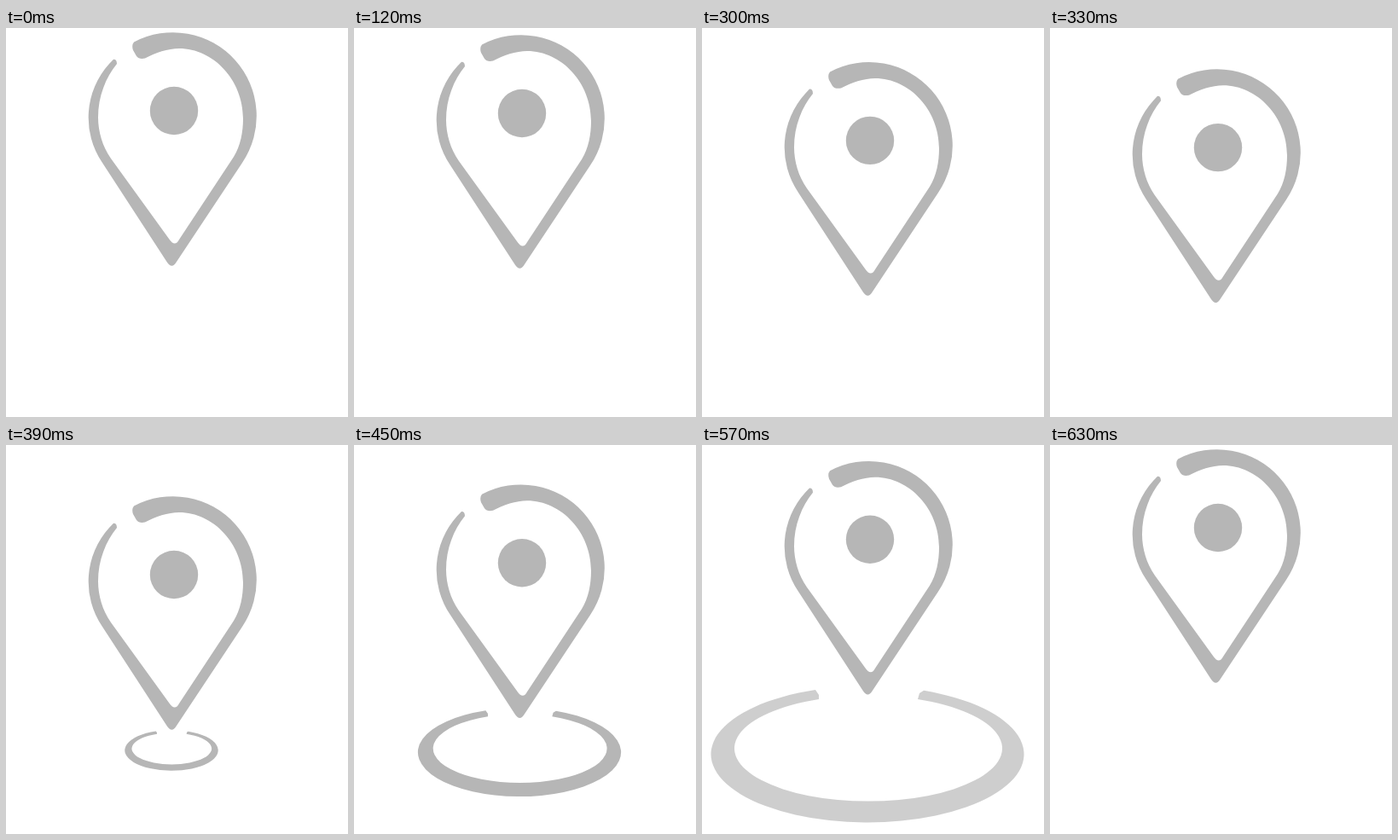
An HTML page for the animation above (750 ms loop, 401 by 456 pixels).

```html
<!DOCTYPE html>
<html lang="en">
<head>
<meta charset="utf-8">
<title>Map pin</title>
<style>
  html, body { margin: 0; width: 100%; height: 100%; overflow: hidden; background: #fff; }
  svg { display: block; width: 401px; height: 456px; fill: #b6b6b6; }
</style>
</head>
<body>
<svg viewBox="0 0 401 456">
  <g id="pin">
    <path d="M150 16.5 A98 98 0 0 1 277 158 L200 274 Q194.5 283.5 188.5 274 L113 158
             A94 94 0 0 1 121 42 L126 36.7 Q130 36.5 130 42
             C117 58 108 80 108 105 C108 121 113 139 123 153 L191 247 Q198 257.5 203 248
             L267 151 C275 138 278 122 278 106 C278 61 243 24 203 24
             C190 24 175 29 163 35.5 Q156 37 153 33 L149 26 Q147 20 150 16.5 Z"/>
    <circle cx="197" cy="97" r="28.2"/>
  </g>
  <path id="ring" d="M133 287 A183.5 80 0 1 0 260 287.8 L255 291 L253 298
                     A157 62 0 1 1 137 298 L137 293 Z"/>
</svg>
<script>
  const LOOP = 750, STEP = 30;
  // Steps at which the pin speeds up, lands and is back at rest
  const RUSH = 8, LAND = 13, REST = 21;
  const DEPTH = 55, RUSH_DEPTH = 16;
  const HUB = { x: 194, y: 356 };
  const pin = document.getElementById('pin');
  const ring = document.getElementById('ring');

  const clamp = v => Math.max(0, Math.min(1, v));
  const progress = (n, from, to) => clamp((n - from) / (to - from));

  function drop(n) {
    if (n < RUSH) return RUSH_DEPTH * progress(n, 0, RUSH) ** 2.4;
    if (n < LAND) return DEPTH - (DEPTH - RUSH_DEPTH) * (1 - progress(n, RUSH, LAND)) ** 1.3;
    return DEPTH * (1 - progress(n, LAND, REST));
  }

  function draw(time) {
    const n = Math.min(REST, Math.floor((time % LOOP) / STEP));
    const size = progress(n, 11.3, 17);
    pin.setAttribute('transform', `translate(0 ${drop(n)})`);
    ring.setAttribute('transform',
      `translate(${HUB.x} ${HUB.y}) scale(${size}) translate(${-HUB.x} ${-HUB.y})`);
    ring.setAttribute('opacity', 1 - progress(n, REST - 3, REST));
  }

  const start = performance.now();
  function tick() {
    draw(performance.now() - start);
    requestAnimationFrame(tick);
  }
  draw(0);
  requestAnimationFrame(tick);
</script>
</body>
</html>
```
